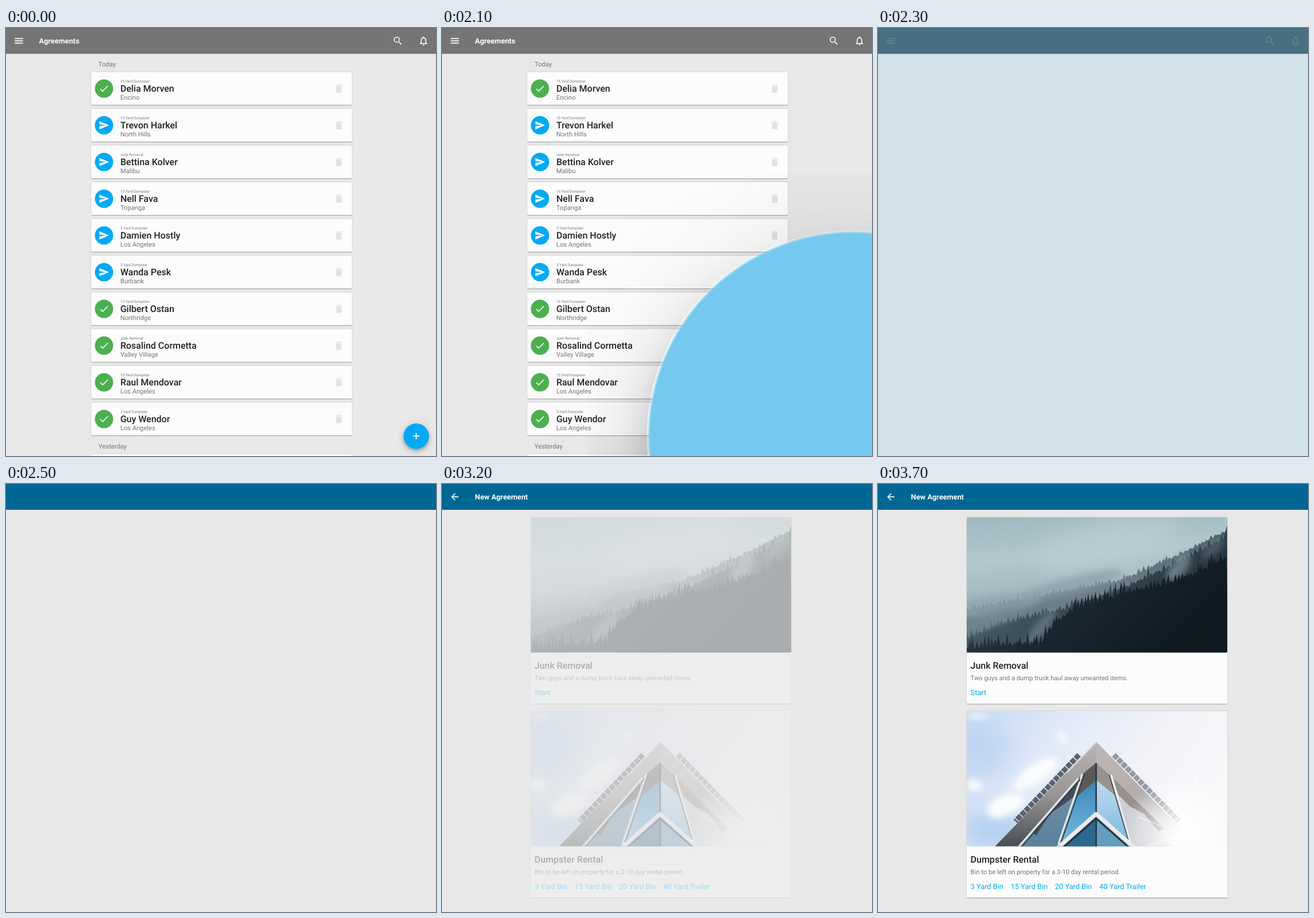
Recreate the animation shown at these times as an HTML page. Size 751 px wide and 746 px high, loop 4.3 s.

```html
<!DOCTYPE html>
<html lang="en">
<head>
<meta charset="utf-8">
<title>Agreements</title>
<style>
html, body { margin: 0; width: 100%; height: 100%; overflow: hidden; background: #e8e8e8; }
#stage { position: relative; width: 100%; height: 100%; overflow: hidden; contain: strict; }
svg.layer { position: absolute; left: 0; top: 0; width: 751px; height: 746px; }
text { font-family: Roboto, Arial, sans-serif; font-size: 11.2px; fill: #757575; white-space: pre; text-rendering: geometricPrecision; }
.bar { font-size: 12.8px; font-weight: 700; fill: #fff; }
.name { font-size: 16px; font-weight: 500; fill: #212121; }
.tiny { font-size: 6.4px; }
.link { font-size: 12.8px; fill: #03a9f4; }
.card { fill: #fcfcfc; filter: drop-shadow(0 1px .7px rgba(0,0,0,.27)) drop-shadow(0 .4px 1.6px rgba(0,0,0,.12)); }
#fab {
  position: absolute; left: 694px; top: 689.1px; width: 44.8px; height: 44.8px; border-radius: 50%;
  background: radial-gradient(closest-side, currentColor 98.5%, transparent);
  box-shadow: 0 2.4px 4px -.8px rgba(0,0,0,.2), 0 4.8px 8px rgba(0,0,0,.14), 0 .8px 14.4px rgba(0,0,0,.12);
}
#fab svg { display: block; width: 44.8px; height: 44.8px; }
</style>
</head>
<body>
<div id="stage">
  <svg class="layer" id="list"></svg>
  <div id="fab"><svg id="plus"></svg></div>
  <svg class="layer" id="top"></svg>
  <svg class="layer" id="detail"></svg>
</div>
<script>
const $ = id => document.getElementById(id);
const icons = {
  menu: 'M3 6h18v2H3zM3 11h18v2H3zM3 16h18v2H3z',
  search: 'M15.5 14h-.79l-.28-.27A6.5 6.5 0 1 0 13.73 14.43l.27.28v.79l5 4.99L20.49 19zM9.5 14a4.5 4.5 0 1 1 0-9a4.5 4.5 0 0 1 0 9z',
  bell: 'M12 22c1.1 0 2-.9 2-2h-4c0 1.1.9 2 2 2zm6-6v-5c0-3.07-1.63-5.64-4.5-6.32V4a1.5 1.5 0 0 0-3 0v.68C7.64 5.36 6 7.92 6 11v5l-2 2v1h16v-1zm-2 1H8v-6c0-2.48 1.51-4.5 4-4.5s4 2.02 4 4.5z',
  check: 'M9 16.17L4.83 12l-1.42 1.41L9 19 21 7l-1.41-1.41z',
  send: 'M2 21L23 12 2 3v7l15 2-15 2z',
  trash: 'M6 19c0 1.1.9 2 2 2h8c1.1 0 2-.9 2-2V7H6zM19 4h-3.5l-1-1h-5l-1 1H5v2h14z',
  plus: 'M19 13h-6v6h-2v-6H5v-2h6V5h2v6h6z',
  back: 'M20 11H7.83l5.59-5.59L12 4l-8 8 8 8 1.41-1.41L7.83 13H20z'
};
const icon = (name, x, y, fill = '#fff') =>
  `<path d="${icons[name]}" fill="${fill}" fill-rule="evenodd" transform="translate(${x} ${y}) scale(.8) translate(-12 -12)"/>`;
const text = (x, y, str, cls = '') => `<text x="${x}" y="${y}" class="${cls}">${str}</text>`;
const card = (x, y, h) => {
  const top = Math.round(y);
  return `<rect class="card" x="${x}" y="${top}" width="455" height="${Math.round(y + h) - top}" rx="1.6"/>`;
};
const poly = (points, fill) => `<polygon points="${points}" fill="${fill}"/>`;
const line = (d, color, width, more = '') => `<path d="${d}" fill="none" stroke="${color}" stroke-width="${width}" ${more}/>`;
const blob = (x, y, rx, ry, fill, opacity, turn = 0) =>
  `<ellipse cx="${x}" cy="${y}" rx="${rx}" ry="${ry}" fill="${fill}" opacity="${opacity}" transform="rotate(${turn} ${x} ${y})" filter="url(#${ry > 30 ? 'haze' : 'soft'})"/>`;
const gradient = (id, dir, ...stops) => `<linearGradient id="${id}" ${dir}>` +
  stops.map((c, i) => `<stop offset="${i / (stops.length - 1)}" stop-color="${c}"/>`).join('') + '</linearGradient>';

let seed = 7;
const rand = () => (seed = seed * 16807 % 2147483647) / 2147483647;

// A slope of pointed trees along a polyline, closed at the foot of the picture
function forest(points, height, fill) {
  let d = `M${points[0][0]} 294`;
  points.slice(1).forEach(([x2, y2], i) => {
    const [x1, y1] = points[i];
    for (let x = x1; x < x2; x += 4 + rand() * 5) {
      const y = y1 + (y2 - y1) * (x - x1) / (x2 - x1), h = height * (.15 + .85 * rand() ** 2);
      d += `L${x - 3.5} ${y + 3}L${x - 1.8} ${y - h * .4}L${x} ${y - h}L${x + 1.8} ${y - h * .4}`;
    }
  });
  return `<path d="${d}L612 294Z" fill="${fill}"/>`;
}

// List page
const rows = [
  ['15 Yard Dumpster', 'Delia Morven', 'Encino', 1],
  ['15 Yard Dumpster', 'Trevon Harkel', 'North Hills', 0],
  ['Junk Removal', 'Bettina Kolver', 'Malibu', 0],
  ['15 Yard Dumpster', 'Nell Fava', 'Topanga', 0],
  ['3 Yard Dumpster', 'Damien Hostly', 'Los Angeles', 0],
  ['3 Yard Dumpster', 'Wanda Pesk', 'Burbank', 0],
  ['15 Yard Dumpster', 'Gilbert Ostan', 'Northridge', 1],
  ['Junk Removal', 'Rosalind Cormetta', 'Valley Village', 1],
  ['15 Yard Dumpster', 'Raul Mendovar', 'Los Angeles', 1],
  ['3 Yard Dumpster', 'Guy Wendor', 'Los Angeles', 1]
];
$('list').innerHTML = text(161.6, 67.4, 'Today') + rows.map(([job, name, city, done], i) => {
  const y = 76.8 + 64 * i;
  return card(149, y, 57.6) +
    `<circle cx="171.2" cy="${y + 28.8}" r="16" fill="${done ? '#4caf50' : '#03a9f4'}"/>` +
    icon(done ? 'check' : 'send', 171.2, y + 28.8) +
    text(199.7, y + 18.4, job, 'tiny') + text(199.7, y + 34.6, name, 'name') + text(199.7, y + 48.3, city) +
    icon('trash', 581.2, y + 28.8, '#e2e2e2');
}).join('') + text(161.6, 733.4, 'Yesterday') + card(149, 742.8, 57.6);
$('plus').innerHTML = icon('plus', 22.4, 22.4);

// Toolbar
$('top').innerHTML = `<rect id="bar" width="751" height="45"/>
  <g id="tools">${icon('menu', 22.4, 22.4)}${icon('search', 684.4, 22.4)}${icon('bell', 729.2, 22.4)}</g>
  <g id="title">${text(57.6, 26.6, 'Agreements', 'bar')}</g>
  <g id="newTitle">${icon('back', 22.4, 22.4)}${text(57.6, 26.6, 'New Agreement', 'bar')}</g>`;

// Detail page
const hills = `<g clip-path="url(#clip1)">
  <rect x="155" y="57" width="456" height="237" fill="url(#mist)"/>` +
  blob(400, 105, 130, 40, '#bfd0d5', .6, -12) +
  forest([[155, 218], [230, 206], [330, 186], [430, 166], [520, 126], [612, 80]], 10, 'url(#far)') +
  blob(200, 212, 90, 18, '#8ea3ad', .75, -10) + blob(340, 176, 90, 14, '#8a9ea8', .7, -14) +
  forest([[155, 270], [210, 246], [275, 230], [330, 217], [420, 186], [520, 140], [612, 92]], 16, 'url(#mid)') +
  blob(195, 238, 60, 12, '#74878f', .7, -18) + blob(285, 250, 38, 11, '#788b95', .6, -50) +
  blob(525, 146, 30, 13, '#82959f', .7, -50) + blob(585, 112, 26, 9, '#6d808b', .5, -40) +
  forest([[155, 288], [200, 281], [285, 278], [312, 240], [345, 218], [430, 190], [500, 176], [560, 155], [612, 128]], 24, 'url(#near)') + '</g>';

const tower = `<g clip-path="url(#clip2)">
  <rect x="155" y="396" width="456" height="236" fill="url(#sky)"/>` +
  blob(185, 465, 45, 45, '#b3cff1', .6) + blob(205, 605, 60, 35, '#a5c7ef', .8) +
  blob(222, 560, 34, 18, '#fff', .9, -25) + blob(275, 505, 45, 16, '#fff', .85, -35) +
  blob(168, 525, 14, 9, '#fff', .95) + blob(322, 442, 12, 6, '#fff', .9, 50) + blob(173, 404, 20, 5, '#fff', .8) +
  line('M351 472L240 588', '#5c626d', 9, 'stroke-dasharray="9 1.5"') +
  line('M412 472L526 588', '#9699a3', 9, 'stroke-dasharray="9 1.5"') +
  poly('381,449 204,632 381,632', 'url(#slabL)') + poly('381,449 560,632 381,632', 'url(#slabR)') +
  line('M381 450L330 503', '#dcd8d6', 2) +
  poly('358,505 244,632 381,632 381,486', 'url(#glassL)') + poly('381,486 406,508 515,632 381,632', '#cdd0d5') +
  poly('357,506 345,543 322,560 300,575 276,613 268,606', '#454c54') +
  poly('408,510 500,600 490,606 465,575 440,562 420,542', '#98918e') +
  poly('381,486 357,506 318,632 381,632', 'url(#paneL)') + poly('381,486 406,508 442,632 381,632', 'url(#paneR)') +
  poly('381,486 357,506 346,546 381,516', '#5d5855') + poly('381,486 406,508 418,546 381,516', '#98928f') +
  line('M357 505L315 628M350 513L246 632', '#dfe4e8', 3.5) + line('M360.5 506L320 624M353 515L251 632', '#34434e', 2) +
  line('M407 507L441 628', '#f0f0f1', 4) + line('M404 507L437 620', '#465863', 2) +
  poly('381,576 316,632 381,632', '#2b698f') + poly('381,576 381,632 446,632', '#639dc0') +
  line('M312 636L381 575L450 636', '#ecebea', 7) + line('M321 636L381 583L441 636', '#26333c', 3) +
  line('M381 486V572M381 584V632', '#26333c', 2.5) +
  `<circle cx="535" cy="612" r="105" fill="url(#sun)"/>` +
  line('M535 612L455 580M535 612L470 630M535 612L560 500M535 612L610 560', '#fff', 2, 'opacity=".5"') + '</g>';

const clip = (id, y) => `<clipPath id="${id}"><rect x="155" y="${y}" width="455" height="235.6" rx="1.6"/></clipPath>`;
const blur = (id, size) => `<filter id="${id}" x="-100%" y="-200%" width="300%" height="500%"><feGaussianBlur stdDeviation="${size}"/></filter>`;
const down = 'x2="0" y2="1"', across = 'x2="1" y2=".35"';
let linkX = 161.6;
$('detail').innerHTML = '<defs>' + clip('clip1', 58) + clip('clip2', 396) + blur('soft', 6) + blur('haze', 20) +
  gradient('mist', 'x2=".15" y2="1"', '#9fb8c0', '#b2c7cd', '#a0b4bc', '#6f838e') +
  gradient('far', down, '#4a5d67', '#6d808a', '#647883') +
  gradient('mid', across, '#566974', '#3a4c56', '#25333c') +
  gradient('near', across, '#34444e', '#1a2831', '#0f1a21') +
  gradient('sky', across, '#c3d9f4', '#dfe8f7', '#f1f2f8', '#f8f6f9') +
  gradient('slabL', down, '#b9b6b5', '#989696', '#484c52') +
  gradient('slabR', down, '#bdb7b6', '#b4aeae', '#f2eeee') +
  gradient('glassL', down, '#7d99ad', '#6b8ba3', '#58809e') +
  gradient('paneL', down, '#2f7099', '#4f9bca', '#7ab9dd') +
  gradient('paneR', down, '#cfe2ee', '#a5cfe8', '#78b4d8') +
  `<radialGradient id="sun"><stop stop-color="#fff"/><stop offset=".35" stop-color="#fff" stop-opacity=".75"/><stop offset="1" stop-color="#fff" stop-opacity="0"/></radialGradient></defs>` +
  card(155, 57.6, 325.6) + hills +
  text(161.6, 321.8, 'Junk Removal', 'name') +
  text(161.6, 342, 'Two guys and a dump truck haul away unwanted items.') +
  text(161.6, 368.4, 'Start', 'link') +
  card(155, 396, 325) + tower +
  text(161.6, 659.8, 'Dumpster Rental', 'name') +
  text(161.6, 680, 'Bin to be left on property for a 3-10 day rental period.') +
  [['3 Yard Bin', 70.2], ['15 Yard Bin', 77.3], ['20 Yard Bin', 77.5], ['40 Yard Trailer', 0]].map(([label, step]) => {
    const link = text(linkX, 706.2, label, 'link');
    linkX += step;
    return link;
  }).join('');

const ramp = (t, start, length) => Math.min(1, Math.max(0, (t - start) / length));
const mix = (a, b, p) => `rgb(${a.map((v, i) => Math.round(v + (b[i] - v) * p))})`;
const show = (id, opacity) => $(id).style.opacity = opacity;

function draw(now) {
  const t = Math.floor(now % 4300 / 100) * 100;   // the picture advances in 100 ms ticks
  const grow = t < 1900 ? 0 : ramp(t, 1850, 500);
  const ripple = t === 1500 ? .06 : t === 1600 ? .04 : 0;
  const fab = $('fab').style;
  fab.transform = `scale(${1 + 60 * grow * grow})`;
  fab.color = mix([3, 169, 244], [232, 232, 232], grow + ripple);
  fab.display = $('list').style.display = t < 2400 ? 'block' : 'none';
  show('plus', 1 - ramp(grow, 0, .4));

  $('bar').style.fill = mix([117, 117, 117], [0, 102, 147], ramp(t, 2180, 300));
  show('tools', 1 - ramp(t, 2130, 200));
  show('title', 1 - ramp(t, 2130, 150));
  show('newTitle', ramp(t, 2600, 300));
  show('detail', t < 3200 ? 0 : 1 - (1 - ramp(t, 3120, 520)) ** 2);
}

const start = performance.now();
function loop() {
  draw(performance.now() - start);
  requestAnimationFrame(loop);
}
loop();
</script>
</body>
</html>
```
